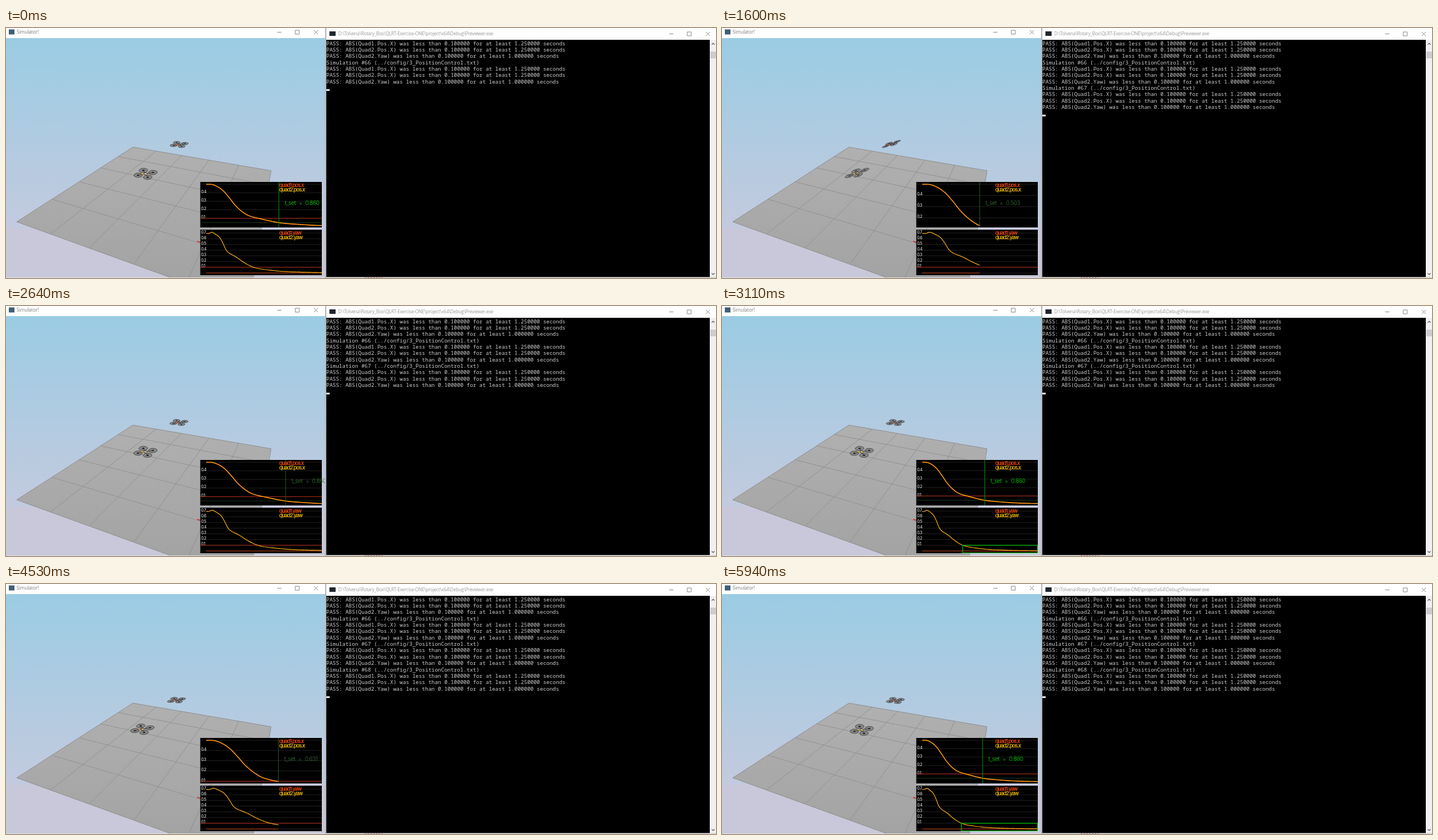
An HTML page that plays this animation: 1259x445 px, repeating every 5.99 s.

```html
<!DOCTYPE html>
<html lang="en">
<head>
<meta charset="utf-8">
<title>Quad position control</title>
<style>
  html, body { margin: 0; width: 100%; height: 100%; overflow: hidden; background: #fff; }
  svg { display: block; width: 1259px; height: 445px; }
  text { white-space: pre; }
  .title { font: 8.2px "Open Sans", sans-serif; }
  .console { font: 9.44px "Noto Sans Mono", monospace; fill: #ccc; }
  .legend { font: 9.5px Inter, sans-serif; letter-spacing: -.95px; }
  .tick { font: 7px Inter, sans-serif; letter-spacing: -.6px; fill: #fff; }
  .settle { font: 300 10px Inter, sans-serif; letter-spacing: -.4px; word-spacing: 3px; }
  .drone * { vector-effect: non-scaling-stroke; }
</style>
</head>
<body>
<svg viewBox="0 0 1259 445">
  <defs>
    <linearGradient id="sky" x1="0" y1="0" x2="0" y2="1">
      <stop offset="0" stop-color="#9acce4"/><stop offset="1" stop-color="#c3cade"/>
    </linearGradient>
    <linearGradient id="ground" gradientUnits="userSpaceOnUse" x1="250" y1="212" x2="250" y2="445">
      <stop offset="0" stop-color="#b0b0b0"/><stop offset="1" stop-color="#a3a3a3"/>
    </linearGradient>
    <clipPath id="view"><rect y="18" width="566" height="426"/></clipPath>
    <clipPath id="topPanel"><rect x="344.5" y="274" width="215.5" height="81"/></clipPath>
    <clipPath id="lowPanel"><rect x="344.5" y="359" width="215.5" height="81"/></clipPath>
  </defs>

  <rect width="1259" height="445" fill="#fff"/>
  <g clip-path="url(#view)">
    <rect y="18" width="566" height="339" fill="url(#sky)"/>
    <rect y="357" width="566" height="88" fill="#c8c8da"/>
    <path id="floor" fill="url(#ground)" stroke="#8c8c8c"/>
    <path id="grid" fill="none" stroke="#8e8e8e" stroke-width=".9"/>
    <path d="M339 379.5L346 382" stroke="#d22" stroke-width="1.5"/>
    <g id="rear" class="drone"></g>
    <g id="front" class="drone"></g>
    <rect x="344.5" y="274" width="215.5" height="81"/>
    <rect x="344.5" y="359" width="215.5" height="81"/>
    <g id="position" clip-path="url(#topPanel)"></g>
    <g id="yaw" clip-path="url(#lowPanel)"></g>
    <g id="settle"></g>
    <g class="legend" fill="#ff4a10" stroke="#ff4a10" stroke-width=".2">
      <text x="484.5" y="283">quad1.pos.x</text><text x="484.5" y="368">quad1.yaw</text>
    </g>
    <g class="legend" fill="#ffc400" stroke="#ffc400" stroke-width=".2">
      <text x="484.5" y="291.3">quad2.pos.x</text><text x="484.5" y="376.3">quad2.yaw</text>
    </g>
  </g>
  <path d="M0 444.5H566" stroke="#e4e4e4"/>

  <rect x="5" y="2.5" width="10" height="9" fill="#3f5f74"/>
  <text class="title" x="19" y="10" fill="#777">Simulator!</text>

  <path d="M567 0V445" stroke="#9a9a9a" stroke-width="1.5"/>
  <rect x="568" y="21" width="680" height="422.5"/>
  <rect x="1248.5" y="21" width="10.5" height="422.5" fill="#f0f0f0"/>
  <rect x="1249" y="42" width="10" height="12" fill="#cdcdcd"/>
  <path d="M1251.5 29.5l2.5-2.500 2.500 2.500M1251.5 436.500l2.500 2.500 2.500-2.500" fill="none" stroke="#555" stroke-width="1.200"/>
  <path d="M568 444H1259" stroke="#bbb"/>
  <path d="M636 444.300H668" stroke="#a66" stroke-dasharray="3 2"/>
  <rect x="573.500" y="6" width="11" height="8" fill="#20242c"/>
  <text class="title" x="589" y="13.200" fill="#999" letter-spacing="-.25">D:\Tolvena\Rotary_Box\QLRT-Exercise-ONE\project\x64\Debug\Previewer.exe</text>
  <g id="buttons" fill="none" stroke="#777" stroke-width=".9"></g>
  <g id="console" class="console"></g>
  <rect id="caret" x="568" width="6" height="3" fill="#eee"/>
  <path id="pointer" d="M0 0V11L2.600 8.700 4.300 12.500 6 11.700 4.300 8H7.600Z" fill="#fff" stroke="#000" stroke-width=".7"/>
</svg>
<script>
const LOOP = 5990, RATE = 0.00072, SETTLED = 0.86, LEFT = 355, RIGHT = 560;
const $ = id => document.getElementById(id);

// Smooth curve through [time, value] knots.
function spline(knots) {
  const last = knots.length - 1;
  const slope = i => {
    const a = knots[Math.max(0, i - 1)], b = knots[Math.min(last, i + 1)];
    return (b[1] - a[1]) / (b[0] - a[0]);
  };
  return t => {
    if (t <= knots[0][0]) return knots[0][1];
    if (t >= knots[last][0]) return knots[last][1];
    const i = knots.findIndex(k => k[0] > t) - 1;
    const [x0, y0] = knots[i], [x1, y1] = knots[i + 1];
    const h = x1 - x0, u = (t - x0) / h, v = 1 - u;
    return v * v * ((1 + 2 * u) * y0 + u * h * slope(i)) + u * u * ((3 - 2 * u) * y1 - v * h * slope(i + 1));
  };
}

const posAt = spline([[0, .5], [.07, .497], [.14, .469], [.207, .418], [.273, .342], [.34, .258],
  [.42, .183], [.5, .1335], [.63, .098], [.86, .05], [1.03, .034], [1.367, .016], [2, .006]]);
const yawAt = spline([[0, .695], [.03, .693], [.065, .715], [.11, .68], [.16, .62], [.2, .515], [.235, .405],
  [.275, .345], [.32, .308], [.37, .265], [.42, .21], [.5, .138], [.56, .1], [.63, .073], [.86, .032], [1.05, .018], [1.4, .006], [2, .002]]);
const pitchAt = spline([[0, 0], [.1, -.45], [.19, -.35], [.28, 0], [.39, .43], [.5, .4], [.63, .06], [.8, 0], [2, 0]]);
const pointerX = spline([[540, 1040], [600, 1046], [910, 1165], [1240, 1165], [1500, 1256]]);
const pointerY = spline([[540, 445], [600, 428], [910, 402], [1240, 402], [1500, 438]]);

const line = (x1, y1, x2, y2, color, width = 1) =>
  `<path d="M${x1} ${y1}L${x2} ${y2}" stroke="${color}" stroke-width="${width}"/>`;
const across = (y, color) => line(344.5, y, RIGHT, y, color);

function buildFloor() {
  const g = -.1848, h = -.4224;
  const at = (u, v) => {
    const w = 1 + g * u + h * v;
    const x = 225 + u * (245 + g * 470) + v * (-206 + h * 19);
    const y = 212 + u * (42 + g * 254) + v * (133 + h * 345);
    return `${x / w} ${y / w}`;
  };
  $("floor").setAttribute("d", `M${at(0, 0)}L${at(1, 0)}L${at(1, 1)}L${at(0, 1)}Z`);
  let d = "";
  for (let k = 1; k < 5; k++) d += `M${at(k / 5, 0)}L${at(k / 5, 1)}M${at(0, k / 5)}L${at(1, k / 5)}`;
  $("grid").setAttribute("d", d);
}

function buildDrone(id, accent) {
  let arms = "", rotors = "";
  for (let k = 0; k < 4; k++) {
    const a = (k - .5) * Math.PI / 2, x = Math.cos(a), y = Math.sin(a);
    arms += line(0, 0, x, y, "#444", 1);
    rotors += `<circle cx="${x}" cy="${y}" r=".57" fill="#777" fill-opacity=".7" stroke="#333" stroke-width=".8"/>
      <circle cx="${x}" cy="${y}" r=".17" fill="#111"/>`;
  }
  $(id).innerHTML = rotors + arms +
    `<rect x="-.22" y="-.22" width=".44" height=".44" fill="#ddd" stroke="#222" stroke-width="1"/>` +
    line(-.55, .1, -.15, .25, accent, 1.4) + line(.1, -.2, .2, .2, accent, 1.2);
}

function buildButtons() {
  const set = (x, y) => `M${x} ${y}h7.500M${x + 32} ${y - 3.500}h7v7h-7zM${x + 65} ${y - 3.500}l7 7m0-7l-7 7`;
  $("buttons").innerHTML = `<path d="${set(481, 7.500)}${set(1176, 10.500)}"/>`;
}

function buildConsole() {
  const pass = (what, secs) => `PASS: ABS(${what}) was less than 0.100000 for at least ${secs} seconds`;
  const checks = [pass("Quad1.Pos.X", "1.250000"), pass("Quad2.Pos.X", "1.250000"), pass("Quad2.Yaw", "1.000000")];
  const lines = [...checks];
  for (const n of [66, 67, 68]) lines.push(`Simulation #${n} (../config/3_PositionControl.txt)`, ...checks);
  $("console").innerHTML = lines.map((s, i) => `<text x="568" y="${30.500 + i * 11.370}">${s}</text>`).join("");
}

function placeDrone(id, x, y, ax, ay, lift, pitch, yaw) {
  const fx = ax[0], fy = ax[1] - lift * Math.sin(pitch);
  $(id).setAttribute("transform",
    `matrix(${fx} ${fy} ${ay[0]} ${ay[1]} ${x} ${y}) rotate(${yaw * 180 / Math.PI})`);
}

function curve(fn, s, toX, toY, color) {
  let d = "";
  const n = 110;
  for (let i = 0; i <= n; i++) {
    const t = s * i / n;
    d += `${i ? "L" : "M"}${toX(t).toFixed(2)} ${toY(fn(t)).toFixed(2)}`;
  }
  return `<path d="${d}" fill="none" stroke="${color}" stroke-width="1.200"/>`;
}

function ticks(lo, hi, toY) {
  const step = 10 ** Math.floor(Math.log10(hi - lo));
  const digits = Math.max(1, Math.round(-Math.log10(step)));
  let out = "";
  for (let k = Math.ceil(lo / step - 1e-6); k * step <= hi + 1e-6; k++) {
    const v = k * step, y = toY(v);
    out += across(y, "#222");
    if (k > 0 && v < hi - 1e-6) out += `<text class="tick" x="346" y="${y + .5}">${v.toFixed(digits)}</text>`;
  }
  return out;
}

const passBox = (x, y, bottom) =>
  `<rect x="${x}" y="${y}" width="${RIGHT - .500 - x}" height="${bottom - y}" fill="none" stroke="#00c800" stroke-width="1.200"/>`;

function drawCharts(s) {
  const scale = Math.min(203, (RIGHT - LEFT) / s);
  const toX = t => LEFT + t * scale;

  const low = posAt(s), flat = .5 - low < .0005;
  const posY = v => flat ? 315 : 278 + (.5 - v) * 73.5 / (.5 - low);
  let top = flat
    ? across(278, "#222") + across(315, "#222") + `<text class="tick" x="346" y="315.500">0.5000</text>`
    : ticks(Math.max(0, low - .02 * (.5 - low)), .5, posY) + across(posY(.05), "#1c3a1c");
  const posPassed = s >= .62 + 1.25;
  if (!flat && !posPassed) top += across(posY(.1), "#b82a14");
  if (!flat) top += curve(posAt, s, toX, v => posY(v) + .4, "#ff5a10") + curve(posAt, s, toX, posY, "#ffa914");
  if (posPassed) top += passBox(toX(.62), posY(.1), 354);
  $("position").innerHTML = top;

  const high = s < .065 ? Math.max(.695, yawAt(s)) : .715;
  const yawY = v => 436 - v * 72.5 / high;
  const yawPassed = s >= .557 + 1;
  let bottom = ticks(0, high, yawY);
  if (!yawPassed) bottom += across(yawY(.1), "#b82a14");
  bottom += line(LEFT, 436, toX(s), 436, "#c43c10") + curve(yawAt, s, toX, yawY, "#ffb014");
  if (yawPassed) bottom += passBox(toX(.557), yawY(.1), 439.500);
  $("yaw").innerHTML = bottom;

  const shown = Math.min(s, SETTLED), x = toX(shown), done = s > 1.3;
  $("settle").innerHTML = line(x, 274, x, 355, done ? "#00a000" : "#2c5a2c") +
    `<text class="settle" x="${x + 10.500}" y="315" fill="${done ? "#00e000" : "#3c743c"}">t_set = ${shown.toFixed(3)}</text>`;
}

function simTime(t) {
  if (t < 905) return Math.min(2, 1.367 + t * RATE);
  if (t < 3690) return Math.max(.005, .005 + (t - 910) * RATE);
  return .63 + (t - 4530) * RATE;
}

function render(t) {
  const s = simTime(t), moved = 1 - posAt(s) / .5, pitch = pitchAt(s);
  placeDrone("rear", 279 + 29 * moved, 203.300 + 4.200 * moved, [10.1, 1.1], [-4, 3.5], 9, pitch, 0);
  placeDrone("front", 214.300 + 34.300 * moved, 253 + 6.800 * moved, [12, 2.5], [-6.4, 6], 11, pitch, yawAt(s));
  drawCharts(s);

  const rows = t < 905 ? 7 : t < 3690 ? 11 : 15;
  [...$("console").children].forEach((row, i) => row.setAttribute("visibility", i < rows ? "visible" : "hidden"));
  $("caret").setAttribute("y", 29.300 + rows * 11.370);

  const pointer = $("pointer");
  pointer.setAttribute("visibility", t > 540 && t < 1500 ? "visible" : "hidden");
  pointer.setAttribute("transform", `translate(${pointerX(t)} ${pointerY(t)})`);
}

buildFloor();
buildDrone("rear", "#f05a20");
buildDrone("front", "#ffb400");
buildButtons();
buildConsole();
const start = performance.now();
function frame() {
  render((performance.now() - start) % LOOP);
  requestAnimationFrame(frame);
}
frame();
</script>
</body>
</html>
```
